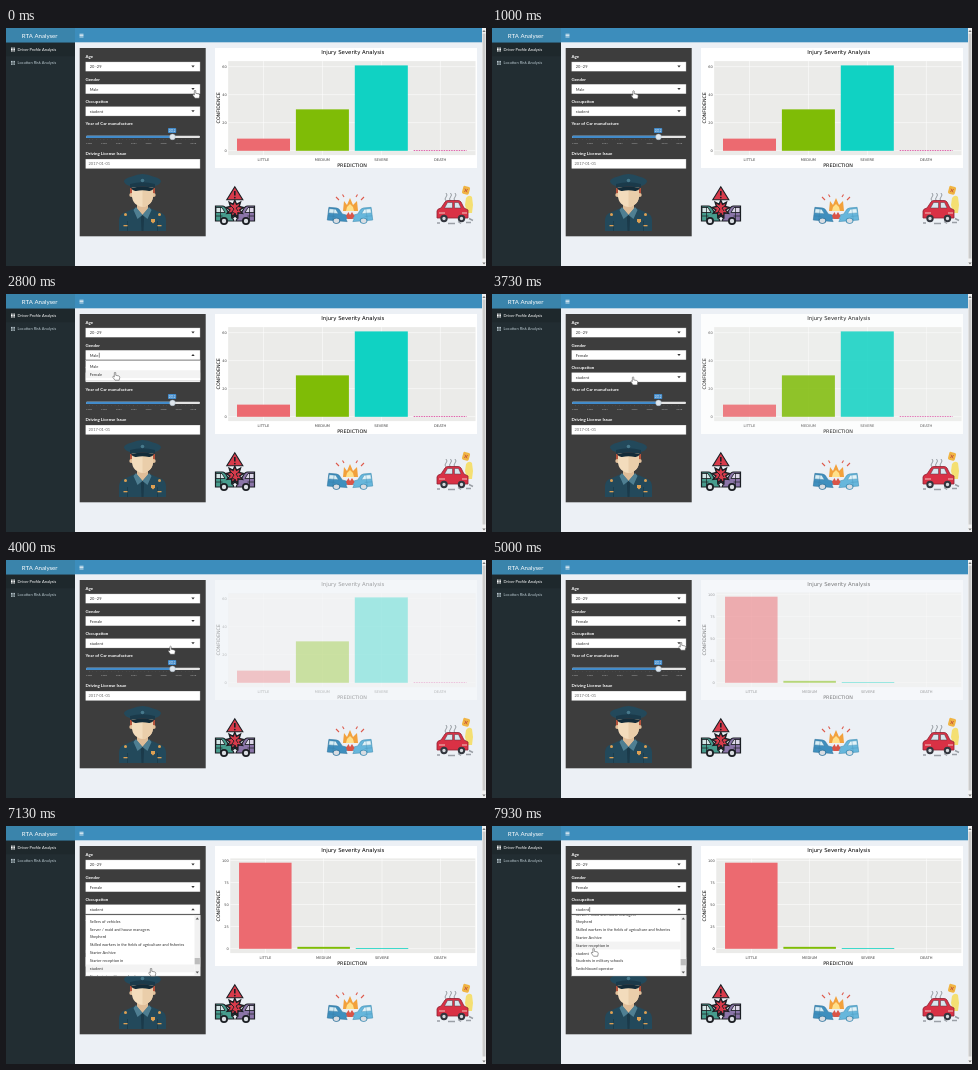
An HTML page with a canvas that plays this animation: 480x238 px, repeating every 8 s.

```html
<!DOCTYPE html>
<html lang="en">
<head>
<meta charset="utf-8">
<title>RTA Analyser</title>
<style>
  html, body { margin: 0; width: 100%; height: 100%; overflow: hidden; background: #ecf0f5; }
  canvas { display: block; width: 480px; height: 238px; }
</style>
</head>
<body>
<canvas id="stage"></canvas>
<script>
const canvas = document.getElementById('stage');
const ctx = canvas.getContext('2d');
const ratio = window.devicePixelRatio || 1;
canvas.width = 480 * ratio;
canvas.height = 238 * ratio;

const LOOP = 8000;
const UI = 'Lato, sans-serif';
const PLOT = '"DejaVu Sans", sans-serif';
const RED = '#ec6a70', GREEN = '#7fbc06', TEAL = '#10d2c3', MAGENTA = '#d8409a';
const INK = '#1c1f24';

const GENDER_OPEN = 1330, GENDER_CLOSE = 3300, JOBS_OPEN = 6440;
const jobs = ['Sellers of vehicles', 'Server / maid and house managers', 'Shepherd',
  'Skilled workers in the fields of agriculture and fisheries', 'Starter Archive',
  'Starter reception in', 'student', 'Students in military schools', 'Switchboard operator'];

// Pointer tip: time, x, y
const pointerPath = [
  [0, 189, 62], [400, 189, 62], [1000, 141.5, 62.5], [1600, 141.5, 62.5], [2400, 113, 76],
  [2700, 109, 78], [3400, 109, 78], [4000, 164.5, 86], [4400, 187, 84], [4600, 187, 84],
  [4730, 189, 82], [5930, 189, 82], [6130, 187, 81], [6330, 187, 81], [6480, 170, 108],
  [6800, 170, 108], [7130, 145, 142], [7330, 145, 142], [7900, 101.5, 122], [8000, 101.5, 122]
];

const oldChart = { x0: 257.5, step: 58.9, unit: 1.4, ticks: [0, 20, 40, 60], values: [8.7, 29.6, 61, 0] };
const newChart = { x0: 259.3, step: 58.35, unit: 0.885, ticks: [0, 25, 50, 75, 100], values: [97.3, 2.2, 0.9, 0] };

const clamp = v => Math.max(0, Math.min(1, v));
const progress = (t, from, to) => clamp((t - from) / (to - from));
const smooth = v => v * v * (3 - 2 * v);

function rect(x, y, w, h, color) {
  ctx.fillStyle = color;
  ctx.fillRect(x, y, w, h);
}

function paint(fill, stroke, width = 0.8) {
  if (fill) { ctx.fillStyle = fill; ctx.fill(); }
  if (stroke) { ctx.strokeStyle = stroke; ctx.lineWidth = width; ctx.stroke(); }
}

function shape(d, fill, stroke, width = 0.8) {
  const path = new Path2D(d);
  if (fill) { ctx.fillStyle = fill; ctx.fill(path); }
  if (stroke) { ctx.strokeStyle = stroke; ctx.lineWidth = width; ctx.stroke(path); }
}

function dot(x, y, r, fill, stroke, width) {
  ctx.beginPath();
  ctx.arc(x, y, r, 0, Math.PI * 2);
  paint(fill, stroke, width);
}

function rounded(x, y, w, h, r, fill) {
  ctx.beginPath();
  ctx.roundRect(x, y, w, h, r);
  paint(fill);
}

function star(x, y, points, outer, inner, fill, stroke, width) {
  ctx.beginPath();
  for (let i = 0; i < points * 2; i++) {
    const a = i * Math.PI / points - Math.PI / 2, r = i % 2 ? inner : outer;
    ctx.lineTo(x + r * Math.cos(a), y + r * Math.sin(a));
  }
  ctx.closePath();
  paint(fill, stroke, width);
}

function text(str, x, y, size, color, { font = UI, weight = 400, align = 'left' } = {}) {
  ctx.font = `${weight} ${size}px ${font}`;
  ctx.textAlign = align;
  ctx.fillStyle = color;
  ctx.fillText(str, x, y);
}

function triangle(x, y, up, color = '#333') {
  const s = up ? -1 : 1;
  shape(`M${x - 1.7} ${y - s}h3.4l-1.7 ${2 * s}z`, color);
}

function placed(x, y, sx, sy, angle, draw) {
  ctx.save();
  ctx.translate(x, y);
  ctx.scale(sx, sy);
  ctx.rotate(angle);
  draw();
  ctx.restore();
}

function drawFrame() {
  rect(0, 0, 480, 238, '#ecf0f5');
  rect(0, 14, 69, 224, '#222d32');
  rect(0, 14.3, 69, 14, '#1e282c');
  rect(0, 0, 476, 14.3, '#3c8dbc');
  rect(0, 0, 69, 14.3, '#3a84ab');
  text('RTA Analyser', 33.7, 9.5, 6.1, '#fff', { align: 'center' });
  for (const y of [5.8, 7.2, 8.6]) rect(73.5, y, 4, 0.75, '#fff');

  [['Driver Profile Analysis', 21.6, '#fff'], ['Location Risk Analysis', 34.9, '#b8c7ce']].forEach(([label, y, color]) => {
    for (let i = 0; i < 9; i++) rect(5 + i % 3 * 1.4, y - 2 + Math.floor(i / 3) * 1.4, 1.1, 1.1, color);
    text(label, 11.6, y + 1.5, 4, color);
  });

  rect(476, 0, 4, 238, '#f1f1f1');
  rect(476.6, 5.5, 2.9, 225, '#cbcbcb');
  triangle(478, 3, true, '#777');
  triangle(478, 235.5, false, '#777');
}

function field(label, y, value, { open = false, caret = false, select = true, color = '#333' } = {}) {
  text(label, 79.5, y - 3.7, 4.4, '#fff', { weight: 700 });
  rect(79.5, y, 114.7, 9.6, '#bbb');
  rect(79.9, y + 0.35, 113.9, 8.9, '#fff');
  text(value, select ? 83.7 : 82.5, y + 6.3, 4, color);
  if (caret) rect(84.2 + ctx.measureText(value).width, y + 2.5, 0.5, 5, '#222');
  if (select) triangle(187, y + 4.7, open);
}

function drawSlider() {
  text('Year of Car manufacture', 79.5, 97.2, 4.4, '#fff', { weight: 700 });
  rounded(80, 107.8, 114, 2.1, 1, '#e4e4e4');
  rounded(80, 107.8, 86, 2.1, 1, '#428bca');
  for (let i = 0; i <= 28; i++) rect(83 + i * 3.7, 111, 0.3, i % 4 ? 0.6 : 1.2, '#777');
  [1980, 1986, 1991, 1997, 2002, 2008, 2013, 2018].forEach((year, i) =>
    text(String(year), 83 + i * 14.9, 116.2, 2.6, '#b5b5b5', { align: 'center' }));
  rounded(162, 99.9, 8.2, 5.2, 0.8, '#428bca');
  text('2012', 166.1, 103.6, 2.9, '#e4eef8', { align: 'center' });
  dot(166.5, 108.9, 2.8, '#dfe6ec', '#9fb4c6', 0.4);
}

function drawOfficer() {
  const coat = '#23495b', shade = '#1b3a4a', skin = '#f3dcbc', gold = '#dda053';
  shape('M113 203v-11q0-6 7-8l9-4h15l9 4q7 2 7 8v11z', coat);
  shape('M121.5 203v-10M151.5 203v-10', null, shade);
  shape('M131 173h11v8l-5.5 6-5.5-6z', '#dfbd98');
  shape('M130 179l6.5 8-5 4-4-9zM143 179l-6.5 8 5 4 4-9z', '#4f7f92');
  shape('M136.5 187l1.6 2-.6 14h-2l-.6-14z', shade);
  for (const x of [119.5, 153.5]) {
    dot(x, 186.5, 1.5, gold);
    rect(x - 2, 197, 4, 1.3, gold);
  }
  shape('M145 191h4v2.500l-2 2-2-2z', gold);
  rounded(124, 157, 25, 10, 2, '#b5533c');
  dot(125.3, 167, 2, '#e4c29c');
  dot(147.7, 167, 2, '#e4c29c');
  shape('M126 159h21v10q-1 6-5 8-5.500 4-11 0-4-2-5-8z', skin);
  shape('M136.500 159h10.500v10q-1 6-5 8-2.500 2-5.500 2z', '#eaceaa');
  shape('M118 153.500q0-3 8-5 5-2.500 10.500-2.500t10.500 2.500q8 2 8 5-1 3-6 4.500h-25q-5-1.500-6-4.500z', coat);
  shape('M124 156q12.500-3.500 25 0v4q-12.500-2.500-25 0z', shade);
  shape('M125 160q11.500-3 23 0-2 3.500-5 3-6.500-1.500-13 0-3 .5-5-3z', '#142c39');
  dot(136.5, 152.5, 1.8, '#47798c');
}

function drawPanel(t) {
  const genderOpen = t >= GENDER_OPEN && t < GENDER_CLOSE;
  const jobsOpen = t >= JOBS_OPEN;
  const blink = since => (t - since) % 1000 < 500;
  rect(73.7, 20, 126, 188.3, '#3d3d3d');
  field('Age', 33.8, '20 -29');
  field('Gender', 56.2, t < GENDER_CLOSE ? 'Male' : 'Female',
    { open: genderOpen, caret: genderOpen && blink(GENDER_OPEN) });
  field('Occupation', 78.5, 'student', { open: jobsOpen, caret: jobsOpen && blink(JOBS_OPEN) });
  drawSlider();
  field('Driving License Issue', 131, '2017-01-01', { select: false, color: '#666' });
  drawOfficer();
}

function drawChart({ x0, step, unit, ticks, values }) {
  const base = 122.8, left = x0 - step * 0.6, width = step * 4.2;
  const top = base - Math.max(...values) * unit - 4.3;
  const centre = i => x0 + i * step;
  rect(209, 20, 262, 120, '#fff');
  rect(left, top, width, base + 4.3 - top, '#ebebe9');
  text('Injury Severity Analysis', 346.7, 25.7, 5.38, '#000', { font: PLOT, align: 'center' });
  for (const tick of ticks) {
    const y = base - tick * unit;
    rect(left, y - 0.25, width, 0.5, '#fff');
    text(String(tick), left - 1.5, y + 1.3, 3.5, '#444', { font: PLOT, align: 'right' });
  }
  ['LITTLE', 'MEDIUM', 'SEVERE', 'DEATH'].forEach((label, i) => {
    rect(centre(i) - 0.25, top, 0.5, base + 4.3 - top, '#fff');
    text(label, centre(i), 132.7, 3.65, '#444', { font: PLOT, align: 'center' });
  });
  values.forEach((value, i) => {
    const w = step * 0.9, h = value * unit;
    if (h) rect(centre(i) - w / 2, base - h, w, h, [RED, GREEN, TEAL][i]);
  });
  if (values[2] > 1) {
    ctx.setLineDash([1.5, 1]);
    shape(`M${centre(3) - step * 0.45} ${base - 0.3}h${step * 0.9}`, null, MAGENTA, 0.8);
    ctx.setLineDash([]);
  }
  text('PREDICTION', 346, 139.1, 4.85, '#000', { font: PLOT, align: 'center' });
  placed(213.7, 79.8, 1, 1, -Math.PI / 2, () =>
    text('CONFIDENCE', 0, 0, 4.75, '#000', { font: PLOT, align: 'center' }));
}

// Front half of a car, nose to the right
function drawHalfCar(color, glass, line, weight) {
  shape('M0 16V1h7q2.500 0 4.500 4l1.500 2.500 4.500 1 1.500 3-2 1.500 1.500 3z', color, line, weight);
  shape('M.5 2.500h6l3 5h-9z', glass, line, weight * 0.7);
  shape('M0 11h7M5 2v14', null, line, weight * 0.6);
  dot(8.5, 16, 3.1, '#d9dde2', line, weight * 1.5);
}

function drawCollision() {
  placed(209.5, 177, 1, 1, 0, () => drawHalfCar('#479c8d', '#d4e6e6', INK, 1.2));
  placed(248.5, 177, -1, 1, 0, () => drawHalfCar('#8b75a8', '#dcd6e8', INK, 1.2));
  star(228.800, 181, 9, 8.8, 5, '#d83b4b', INK, 1.4);
  shape('M225 178l3 3-2 3 4 2m3-8l-3 2 2 3', null, INK, 0.9);
  shape('M228.800 158.800l8 13h-16z', '#d83b4b', INK, 1.1);
  rect(228, 163, 1.6, 4.5, INK);
  dot(228.800, 169.600, 0.9, INK);
}

function drawHeadOn() {
  shape('M337 183l1-10 3 4 3-7 3 7 4-4 1 10z', '#f2a13c');
  shape('M340 183l1-4 3-3 3 3 1 4z', '#ffe08a');
  placed(323, 178.500, 1.08, 0.85, 0.1, () => drawHalfCar('#3f8fbe', '#d8eef5', '#3678a0', 0.6));
  placed(365, 178.500, -1.08, 0.85, 0.1, () => drawHalfCar('#67b7dc', '#e2f3f8', '#438fb5', 0.6));
  shape('M333 172l-3-3M338 169l-1.500-2.500M350 169l1.500-2.500M355 172l3-3', null, '#de5a4c', 1.1);
  shape('M340 188l2.500-4 1.500 3 2-3 2.500 4-2 3h-5z', '#d95548');
}

function drawBreakdown() {
  for (const x of [440, 444.5, 449])
    shape(`M${x} 173q-2-2 0-4t0-4`, null, '#8d9298', 0.9);
  shape('M460 170q3-4 6-1l1 8-1 8h-5l-2-8z', '#f4df72');
  placed(460, 162.500, 1, 1, 0.25, () => {
    rounded(-3.5, -4.2, 7, 8, 1.5, '#f0b443');
    shape('M-1.500-1.500l3 3m0-3l-3 3', null, '#c5543a', 0.8);
  });
  shape('M431 190v-7q0-2 4-3l4-6q1-1.500 3-1.500h10q2 0 3 1.500l3 6 4 2v8z', '#d93145', '#8e2233', 0.8);
  shape('M438.500 180l3-5.500h5v5.500zM448.500 174.500h4l2.500 5.500h-6.500z', '#d6e6ee', '#5a3440', 0.5);
  shape('M433 185h6m17 0h5', null, '#f3c7c0', 1);
  for (const x of [438, 455.5]) dot(x, 190.5, 2.7, '#d5d9dd', '#33363e', 2);
  shape('M431 195h3m8 .5h7m3-2l3 2m5-1h5m-2-4l4 2', null, '#9a9fa6', 1.4);
}

function drawList(items, y, height, firstRow, pitch, tipY, rowWidth) {
  ctx.save();
  ctx.beginPath();
  ctx.rect(79.5, y, 115, height);
  ctx.clip();
  rect(79.5, y, 115, height, '#fff');
  items.forEach((item, i) => {
    const middle = firstRow + i * pitch;
    if (Math.abs(tipY - middle) <= pitch / 2) rect(80, middle - pitch / 2, rowWidth, pitch, '#f3f3f3');
    text(item, 83.7, middle + 1.3, 3.97, '#333');
  });
  ctx.restore();
  ctx.strokeStyle = '#bbb';
  ctx.lineWidth = 0.4;
  ctx.strokeRect(79.7, y, 114.6, height);
}

function drawDropdown(t, tipY) {
  if (t >= GENDER_OPEN && t < GENDER_CLOSE)
    drawList(['Male', 'Female'], 66.3, 20.2, 72.4, 7.8, tipY, 114);
  if (t >= JOBS_OPEN) {
    const turned = smooth(progress(t, 7330, 7670));
    drawList(jobs, 89, 61, 95.5 - 15.1 * turned, 7.82, tipY, 108.5);
    rect(188.5, 89.2, 5.6, 60.6, '#f1f1f1');
    rect(188.7, 132 + turned, 5.2, 6.3, '#bdbdbd');
    triangle(191.3, 92.5, true, '#555');
    triangle(191.3, 146.5, false, '#555');
  }
}

function pointerAt(t) {
  const next = pointerPath.findIndex(p => p[0] > t);
  const [ta, xa, ya] = pointerPath[next - 1], [tb, xb, yb] = pointerPath[next];
  const k = smooth(progress(t, ta, tb));
  return [xa + (xb - xa) * k, ya + (yb - ya) * k];
}

function drawPointer(x, y) {
  placed(x, y, 0.95, 0.95, 0, () =>
    shape('M-.7 .7Q0-.3 .8 .7V3.500l3 .6q1.300 .4 1.200 1.700L4.400 8.700H0L-2.200 5.700q-.3-1.300 .7-1.200l.8 .7z', '#fff', '#444', 0.55));
}

function render(t) {
  ctx.setTransform(ratio, 0, 0, ratio, 0, 0);
  const [x, y] = pointerAt(t);
  drawFrame();
  drawPanel(t);
  const fresh = t >= 5000;
  ctx.globalAlpha = fresh ? 0.35 + 0.65 * progress(t, 4960, 5130) : 1 - 0.65 * progress(t, 3670, 3930);
  drawChart(fresh ? newChart : oldChart);
  ctx.globalAlpha = 1;
  drawCollision();
  drawHeadOn();
  drawBreakdown();
  drawDropdown(t, y);
  drawPointer(x, y);
}

const start = performance.now();
function tick() {
  render((performance.now() - start) % LOOP);
  requestAnimationFrame(tick);
}
tick();
</script>
</body>
</html>
```
